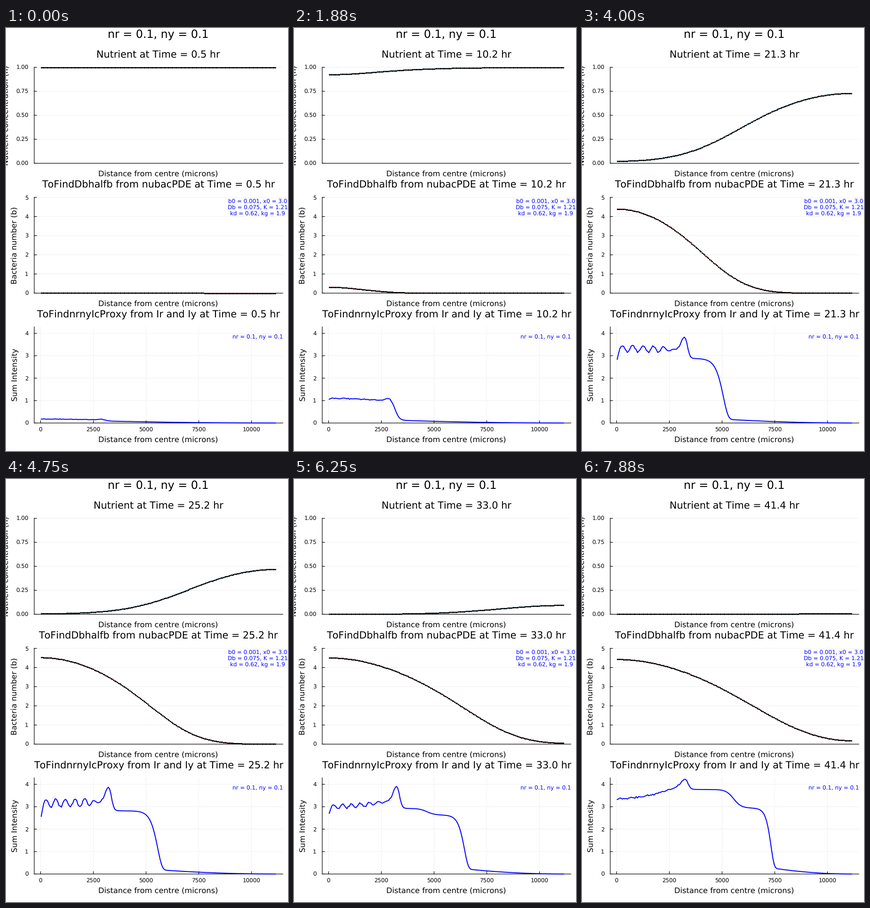
Animation, 599 px wide and 899 px high, one loop 8000 ms. Source, as a matplotlib script:

```python
import numpy as np
import matplotlib.pyplot as plt
from matplotlib.animation import FuncAnimation

W, H, DPI = 599, 899, 100
PT = 72 / DPI  # points per pixel
FRAMES, INTERVAL = 64, 125

# kerning_factor 6 practically switches kerning off
plt.rcParams.update({"font.family": "DejaVu Sans", "text.hinting": "none",
                     "text.kerning_factor": 6, "toolbar": "None"})

LEFT, RIGHT, MID = 60, 588, 323.7
TICK, LABEL, TITLE, SUPER = 11.87, 16.3, 20.8, 23.75  # text sizes in pixels

N, STEP = 186, 60  # cells and their width in microns
dist = 30 + STEP * np.arange(N)
END = dist[-1]
HOURS = 0.65  # simulated time per animation step


def simulate(start=0.5, dt=0.025):
    """Bacteria spread and grow on a diffusing nutrient (mm, hours)."""
    diff_b, diff_n, growth, half, yield_ = 0.075, 2.4, 1.9, 2.2, 2.42
    lap = np.eye(N, k=1) + np.eye(N, k=-1) - 2 * np.eye(N)
    lap[0, 0] = lap[-1, -1] = -1
    lap /= (STEP / 1000) ** 2
    move_b, move_n = (np.linalg.inv(np.eye(N) - dt * d * lap) for d in (diff_b, diff_n))
    b, n = 0.0012 * np.exp(-(dist / 1000) ** 2 / 2), np.ones(N)
    stops = [round((start + HOURS * k) / dt) for k in range(FRAMES)]
    out = []
    for i in range(stops[-1] + 1):
        if i in stops:
            out.append((n, b))
        gain = b * np.expm1(growth * n / (n + half) * dt)
        b, n = move_b @ (b + gain), move_n @ np.maximum(n - gain / yield_, 0)
    return out


PROFILES = simulate()

# Levels of the intensity curve at a few times (hours)
TIMES = [0.5, 10.2, 15.4, 21.3, 29.8, 36.2, 41.4]
INNER = np.log([.175, 1.09, 3.2, 3.32, 2.98, 3.03, 3.36])
RING = [.03, .13, .98, .62, .77, .48, .22]
OUTER = [0, 0, 1.7, 2.72, 2.55, 2.3, 2.7]
JITTER = np.random.default_rng(4).normal(size=N)


def ease(u):
    u = np.clip(u, 0, 1)
    return u * u * (3 - 2 * u)


def drop(x, at, width):
    return 1 / (1 + np.exp((x - at) / width))


def intensity(t):
    x = dist
    front = 3300 + 300 * max(t - 11, 0) ** 0.76
    shift = ease((t - 15.4) / 5.9)

    # outside the ring: tail, advancing front and a later second step
    tail = (.075 + .004 * t) * np.minimum(1, (END - x) / (END - front - 250)) ** 2
    edge = np.exp(-np.exp(np.minimum((x - front) / (300 - 3.6 * t), 50)))
    second = .83 * ease((t - 29) / 10) * drop(x, front - 1775, 180)
    outside = tail + np.interp(t, TIMES, OUTER) * edge + second

    # inside: tilted plateau with ripples, and the ring itself
    level = np.exp(np.interp(t, TIMES, INNER))
    plateau = level * (1 + (.0095 * t - .22) * (x / 3000) ** 2)
    sigma = 150 + 240 * np.exp(-((t - 15.4) / 3) ** 2)
    ring = np.interp(t, TIMES, RING) * np.exp(-((x - 2850 - 375 * shift) / sigma) ** 2 / 2)
    period = np.clip(490 - 8 * (t - 21.3), 420, 490)
    wave = np.cos(2 * np.pi * (x - 30) / period) * drop(x, 2500, 150)
    ripple = -.18 * np.exp(-((t - 25.5) / 9) ** 2) * (wave + 2.2 * np.exp((30 - x) / 60))
    noise = (.005 + .004 * level) * JITTER
    inside = plateau + ring + ripple + noise

    mix = drop(x, 3180 + 230 * shift, 95 - 35 * shift)
    return outside + (inside - outside) * mix


fig = plt.figure(figsize=(W / DPI, H / DPI), dpi=DPI, facecolor="white")
ax = fig.add_axes([0, 0, 1, 1])
ax.set(xlim=(0, W), ylim=(H, 0))
ax.axis("off")


def px(x):
    return 73.5 + .0448 * np.asarray(x)


def text(x, y, s, size, ha="center", color="black", rotation=0):
    return ax.text(x, y, s, size=size * PT, ha=ha, va="baseline", color=color,
                   rotation=rotation, rotation_mode="anchor")


def line(xs, ys, color="black", width=1.2, z=2, **kw):
    return ax.plot(xs, ys, color=color, lw=width * PT, zorder=z,
                   clip_on=False, snap=False, **kw)[0]


class Panel:
    def __init__(self, top, base, unit, ticks, fmt, ylabel, label_x, xlabel_y, title_y):
        self.base, self.unit = base, unit
        for v in ticks:
            y = self.py(v)
            line([LEFT, RIGHT], [y, y], "#f0f0f0", 1, 1)
            line([LEFT, LEFT + 5], [y, y])
            text(47.7, y + 4.4, fmt % v, TICK, "right")
        line([LEFT, LEFT], [top, base])
        line([LEFT, RIGHT], [base, base])
        text(label_x, (top + base) / 2, ylabel, LABEL, rotation=90)
        text(MID, xlabel_y, "Distance from centre (microns)", LABEL)
        self.title = text(MID, title_y, "", TITLE)

    def py(self, v):
        return self.base - self.unit * np.asarray(v)


nut = Panel(83.5, 287.5, 204, np.arange(5) / 4, "%.2f",
            "Nutrient concentration (n)", 5, 315, 63.3)
bac = Panel(360, 563.5, 40.7, range(6), "%d",
            "Bacteria number (b)", 23.3, 591, 339.5)
inten = Panel(635, 839.5, 47.65, range(5), "%d",
              "Sum Intensity", 23.3, 880.3, 615.5)

for v in range(0, 10001, 2500):
    x = float(px(v))
    line([x, x], [635, 839.5], "#f0f0f0", 1, 1)
    line([x, x], [834.5, 839.5])
    text(x, 858, str(v), TICK)

text(MID, 21.3, "nr = 0.1, ny = 0.1", SUPER)
for row, s in enumerate(("b0 = 0.001, x0 = 3.0", "Db = 0.075, K = 1.21",
                         "kd = 0.62, kg = 1.9")):
    text(534.5, 371.6 + 13 * row, s, TICK, color="blue")
text(534.5, 660.8, "nr = 0.1, ny = 0.1", TICK, color="blue")

dots = dict(marker="o", ms=3 * PT, mfc="black", mec="none")
xs = px(dist)
n_line = line(xs, xs, "#009afa", 1, 3, **dots)
b_line = line(xs, xs, "red", 1, 3, **dots)
i_line = line(xs, xs, "blue", 2, 3)


def update(k):
    when = f"at Time = {round(5 + 6.5 * k) / 10:.1f} hr"
    nut.title.set_text(f"Nutrient {when}")
    bac.title.set_text(f"ToFindDbhalfb from nubacPDE {when}")
    inten.title.set_text(f"ToFindnrnyIcProxy from Ir and Iy {when}")
    n, b = PROFILES[k]
    n_line.set_ydata(nut.py(n))
    b_line.set_ydata(bac.py(b))
    i_line.set_ydata(inten.py(intensity(0.5 + HOURS * k)))
    return n_line, b_line, i_line, nut.title, bac.title, inten.title


anim = FuncAnimation(fig, update, frames=FRAMES, interval=INTERVAL,
                     repeat=True, repeat_delay=0)
plt.show()
```
